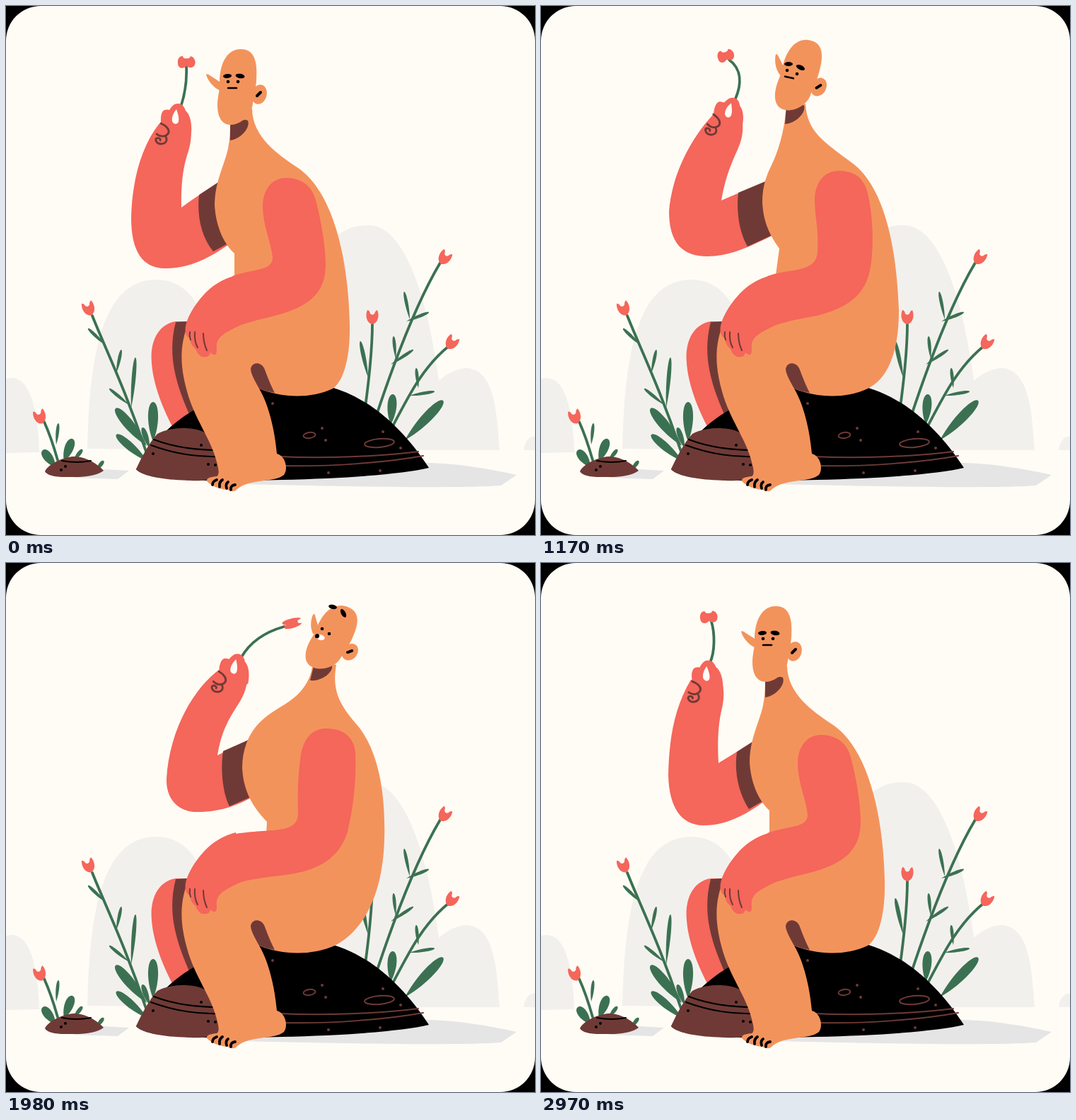
Animation, 748 px wide and 748 px high, one loop 3060 ms. Source, as an HTML page:

```html
<!DOCTYPE html>
<html lang="en">
<head>
<meta charset="utf-8">
<title>Smelling a flower</title>
<style>
  html, body { margin: 0; height: 100%; overflow: hidden; background: #000; }
  svg { display: block; width: 100vw; height: 100vh; }
  .paper { fill: #fffcf5; }
  .hill { fill: #f2f0ed; }
  .shade { fill: #e5e5e6; }
  .skin { fill: #f3935c; }
  .red { fill: #f5665b; }
  .brown { fill: #6f3a36; }
  .green { fill: #3b7152; }
  .line { fill: none; stroke-linecap: round; stroke-width: 2; stroke: #000; }
  .line.brown { stroke: #6f3a36; }
  .line.green { stroke: #3b7152; stroke-width: 3.8; }
</style>
</head>
<body>
<svg viewBox="0 0 748 748">
  <rect class="paper" width="748" height="748" rx="49"/>
  <g class="hill">
    <path d="M0 527C25 520 44 545 47 631L0 632Z"/>
    <path d="M115 626C118 480 140 388 212 387C265 387 285 440 295 500L300 628Z"/>
    <path d="M440 628L455 340C470 318 490 309 515 310C560 312 595 400 612 530C625 518 640 512 652 512C690 515 694 570 698 628Z"/>
    <path d="M732 628C734 612 742 608 748 609V628Z"/>
  </g>
  <path class="shade" d="M590 646C640 646 690 656 722 663L700 678C650 682 500 680 330 676L400 655ZM120 654L174 657L158 669L95 667Z"/>

  <g id="plants">
    <path class="line green" d="M122 438C142 488 168 540 198 630M54 588Q64 610 73 642M518 448C518 490 513 530 508 567M614 363C580 420 550 500 524 578M626 481C590 510 570 550 548 592"/>
  </g>

  <path class="red" d="M240 446C215 450 203 475 206 505C208 535 222 570 236 596L272 572L258 446Z"/>
  <path class="brown" d="M240 447L258 446L252 470C248 510 258 550 270 574L262 584C245 545 226 500 240 447Z"/>

  <path d="M184 655C200 625 232 590 268 570C330 535 400 532 463 540C516 556 562 598 598 653C560 662 480 668 390 670C300 672 200 674 184 655Z"/>
  <path class="brown" d="M184 655C192 637 203 617 214 605C235 594 272 594 285 606L308 650C305 670 285 672 260 671C225 670 195 666 184 655Z"/>
  <path class="line" d="M209 613C240 625 270 628 302 628M205 621C240 634 270 638 302 637"/>
  <path class="line brown" d="M385 637C450 640 530 637 583 630M388 650C460 652 540 645 590 636"/>
  <ellipse class="line brown" cx="429" cy="607" rx="8.5" ry="4" transform="rotate(-8 429 607)"/>
  <ellipse class="line brown" cx="528" cy="618" rx="21" ry="6" transform="rotate(-5 528 618)"/>
  <path class="brown" d="M55 658C62 645 85 637 98 637C115 638 130 648 138 657Q125 667 90 666Q60 667 55 658Z"/>
  <path class="line" d="M79 643Q100 647 120 643"/>
  <g id="dots"></g>

  <path id="rear" class="red"/>
  <path id="band" class="brown"/>
  <path id="body" class="skin"/>
  <path class="skin" d="M258 448C245 480 246 510 256 545C266 583 290 612 298 645C301 656 302 662 298 665C290 666 283 667 284 672C290 678 300 683 313 684Q322 689 327 683C345 668 380 674 393 663C399 655 396 637 383 633C380 600 372 565 358 541L420 540V430Z"/>
  <path class="brown" d="M346 513C348 503 360 503 365 512C370 525 375 538 380 547Q368 545 358 541C352 530 346 520 346 513Z"/>
  <path class="line" style="stroke-width:3.8" d="M298 670q-6 2-6 7M306 670q-5 3-4 10M314 673q-4 3-2 9M324 677q-7 1-6 7"/>

  <path id="arm" class="red"/>
  <path class="red" d="M325 381C300 388 287 399 273 416C262 430 251 450 254 462Q255 468 260 470Q261 480 268 485Q273 498 282 496Q287 497 289 490Q298 498 298 486C296 470 305 464 330 452Z"/>
  <path class="line brown" d="M260 461Q259 467 261 472M267 461Q266 474 271 483M279 463Q279 476 284 487"/>

  <path id="stem" class="line green"/>
  <path id="flower" class="red" d="M-12 2C-13-4-9-9-5-8Q-4-4 0-5Q4-4 6-8C11-7 14-1 12 4C10 9 5 9 0 6C-5 11-12 9-12 2Z"/>
  <g id="hand">
    <path class="red" d="M212 185L219 165Q218 150 224 147Q229 146 231 147C235 141 238 138 243 138C249 138 252 142 254 148C260 153 263 165 262 178L240 195Z"/>
    <path class="paper" d="M241 146C236 152 234 158 235 163C237 168 243 168 244 163C245 158 243 152 241 146Z"/>
    <path class="line brown" style="stroke-width:2.8" d="M219 166C226 169 231 174 230 179C227 185 219 186 213 181M226 185C229 191 225 195 219 195C213 195 210 189 213 187C216 186 219 188 218 190"/>
  </g>

  <path id="neck" class="brown" d="M0-22C8-22 18-32 25-28C29-18 15-2 0 0Z"/>
  <g id="head">
    <g class="skin">
      <path d="M299 140C299 128 303 118 302 105C303 80 313 61 332 61C351 61 356 78 354 105C353 118 352 120 349 138C347 156 330 168 318 168C304 168 299 155 299 140Z"/>
      <path id="nose" d="M304 120C292 116 284 102 283 97Q284 95 288 98L305 109Z"/>
      <ellipse cx="358" cy="125" rx="10.5" ry="14" transform="rotate(15 358 125)"/>
    </g>
    <path class="line" style="stroke-width:4" d="M355 127L360 122"/>
  </g>
  <ellipse id="brow1" rx="6" ry="3"/>
  <ellipse id="brow2" rx="6.5" ry="3.2"/>
  <circle id="eye1" r="2.3"/>
  <circle id="eye2" r="2.3"/>
  <path id="mouth" class="line" style="stroke-width:2.6" d="M-6 0H6"/>
  <g id="grin">
    <ellipse fill="#fff" cx="1" rx="7" ry="4.5"/>
    <circle cx="-5" cy="-1" r="3.6"/>
  </g>
</svg>

<script>
const LOOP = 3060, STEP = 90;
const $ = id => document.getElementById(id);
const add = (id, html) => $(id).insertAdjacentHTML('beforeend', html);

// Plants: leaves from rounded tip to pointed base, and tulips
function leaf(x1, y1, x2, y2, w = 3.6) {
  const len = Math.hypot(x2 - x1, y2 - y1);
  const nx = (y1 - y2) / len * w, ny = (x2 - x1) / len * w;
  const mx = (x1 + x2) / 2, my = (y1 + y2) / 2;
  add('plants', `<path class="green" d="M${x2} ${y2}
    C${mx + nx} ${my + ny} ${x1 + nx * .7} ${y1 + ny * .7} ${x1} ${y1}
    C${x1 - nx * .7} ${y1 - ny * .7} ${mx - nx} ${my - ny} ${x2} ${y2}"/>`);
}
function tulip(x, y, a) {
  add('plants', `<path class="red" transform="translate(${x} ${y})rotate(${a})"
    d="M-7-10C-10-4-9 8 0 10C9 8 10-4 7-10Q4-9 3-5Q0-2-3-5Q-4-10-7-10Z"/>`);
}
const dot = (x, y, cls = '') => add('dots', `<circle class="${cls}" cx="${x}" cy="${y}" r="2"/>`);

leaf(116, 456, 140, 479); leaf(163, 486, 156, 519); leaf(183, 497, 177, 568, 4.5); leaf(146, 541, 174, 564);
leaf(155, 569, 199, 622, 11); leaf(208, 560, 208, 616, 11); leaf(156, 606, 200, 644, 9); leaf(193, 596, 203, 625, 6);
leaf(74, 590, 71, 620); leaf(94, 612, 82, 644, 10); leaf(52, 628, 70, 652, 10); leaf(108, 627, 96, 642, 4.5); leaf(138, 643, 128, 656, 4.5);
leaf(501, 474, 512, 525, 4.5); leaf(563, 404, 571, 443); leaf(598, 433, 566, 446); leaf(548, 467, 551, 498);
leaf(576, 486, 544, 507); leaf(580, 512, 583, 540); leaf(606, 545, 570, 551); leaf(547, 549, 544, 592, 10);
leaf(618, 558, 564, 614, 11);
tulip(117, 428, -20); tulip(48, 581, -18); tulip(518, 440, 0); tulip(620, 356, 32); tulip(630, 476, 32);

[[377, 562], [447, 597], [452, 614], [533, 602], [558, 625], [529, 657], [456, 660]].forEach(p => dot(...p, 'brown'));
[[276, 621], [208, 633], [286, 648], [296, 649], [78, 656], [84, 651]].forEach(p => dot(...p));

// Tracks: every part is a string of numbers keyed by time
const tracks = {};
const NUM = /-?\d*\.?\d+/g;
function pose(time, parts) {
  for (const [id, shape] of Object.entries(parts)) {
    const track = tracks[id] ||= { shape, keys: [] };
    track.keys.push({ time, v: shape.match(NUM).map(Number) });
  }
}

const rest = {
  body: 'M317 165C317 195 313 208 308 222C299 248 295 262 295 282C297 315 310 338 323 350L323 380L300 450L358 541C390 554 430 556 462 541C478 530 487 495 486 450C484 350 460 258 410 227C385 210 348 185 348 145',
  arm: 'M320 382C350 371 377 375 377 356C375 335 363 310 363 283C363 260 376 243 396 243C418 243 433 255 438 275C445 300 452 340 452 365C452 405 430 425 380 438C355 444 340 448 325 454',
  head: '318 168 0 1', nose: '0',
  neck: '317 190 0',
  brow1: '313 99 -5', brow2: '331 99 8', eye1: '314 107', eye2: '328 107',
  mouth: '320 116 0', grin: '320 116 0 0'
};

pose(0, {
  ...rest,
  rear: 'M305 246C285 260 268 270 248 285C247 250 251 225 258 205C261 195 262 185 262 176L217 166C190 200 178 250 177 300C177 345 192 371 225 371C260 371 290 356 325 330',
  band: 'M273 267C270 295 275 325 293 347L325 330L305 246',
  hand: '240 157 0',
  stem: 'M247 143C253 125 256 105 255 85',
  flower: '255 79 0 1 1'
});
pose(810, {
  body: 'M318 180C318 205 316 215 313 228C304 250 296 268 295 292C297 320 310 340 324 356L323 380L300 450L358 541C390 554 430 556 466 541C487 532 503 495 502 440C500 350 470 260 410 226C375 207 349 190 349 155',
  arm: 'M320 382C350 372 378 375 378 357C375 330 365 310 365 285C365 258 380 241 400 241C422 241 436 255 441 275C447 300 453 340 453 365C453 405 430 425 380 438C355 444 340 448 325 454',
  rear: 'M314 238C290 257 268 270 248 285C247 250 251 225 258 205C261 195 262 185 262 176L217 166C190 200 178 250 177 300C177 345 192 371 225 371C260 371 290 356 325 330',
  band: 'M275 266C271 295 276 325 292 347L325 330L314 238',
  head: '313 187 0 .9', nose: '-4',
  neck: '318 207 0',
  brow1: '303 123 -5', brow2: '320 123 8', eye1: '304 132', eye2: '318 132',
  mouth: '310 141 0', grin: '310 141 0 0',
  hand: '240 157 0',
  stem: 'M247 143C253 125 257 100 256 80',
  flower: '255 73 -8 1 1'
});
pose(1170, {
  body: 'M346 150C344 175 336 205 326 225C316 245 313 260 313 277C314 310 328 330 337 343L332 380L300 450L358 541C390 554 430 556 462 541C488 528 506 495 506 430C503 340 485 255 440 222C400 192 376 178 374 138',
  arm: 'M320 382C355 370 391 378 391 345C393 315 387 300 387 272C388 250 400 233 421 233C443 233 457 243 462 265C470 300 470 335 467 362C462 405 440 425 390 438C355 444 340 448 325 454',
  rear: 'M322 246C295 258 275 266 255 275C260 245 268 225 278 203C284 190 286 178 285 166L242 155C210 190 185 240 181 290C181 335 200 354 235 354C270 354 300 338 340 318',
  band: 'M279 264C276 290 280 320 292 340L340 318L322 246',
  head: '345 147 12 .97', nose: '19',
  neck: '345 167 4',
  brow1: '350 82 0', brow2: '367 87 25', eye1: '348 91', eye2: '362 96',
  mouth: '351 101 13', grin: '351 101 13 0',
  hand: '266 148 10',
  stem: 'M275 131C283 112 285 90 266 76',
  flower: '261 70 -14 .95 1'
});
pose(1620, {
  body: 'M412 120C408 165 385 178 358 195C318 222 305 250 305 280C307 320 328 345 339 350L338 378L300 450L358 541C390 554 430 556 462 541C500 515 514 470 515 390C518 320 510 250 475 215C445 180 432 165 442 110',
  arm: 'M320 384C360 370 407 378 407 340C404 315 406 290 412 258C417 238 428 225 445 225C470 225 484 238 486 255C489 290 485 350 477 378C465 410 440 430 395 438C355 444 340 448 325 454',
  rear: 'M325 231C308 236 298 239 285 243C297 215 310 200 325 183C338 170 346 160 348 145L316 121C260 145 205 230 201 275C200 305 220 319 250 319C275 319 295 315 325 307',
  band: 'M299 239C291 265 290 290 295 315L325 307L325 231',
  head: '413 125 23 .94', nose: '24',
  neck: '406 143 15',
  brow1: '449 36 0', brow2: '463 46 75', eye1: '430 69', eye2: '441 76',
  mouth: '430 82 20', grin: '430 82 10 1',
  hand: '332 128 30',
  stem: 'M346 116C360 100 385 80 406 72',
  flower: '408 67 72 .9 1'
});
pose(1980, {
  body: 'M434 140C430 185 395 198 375 212C345 232 334 260 334 290C336 330 356 352 369 366L368 382L300 450L358 541C390 554 430 556 465 541C505 520 533 470 535 390C537 320 525 260 493 225C470 198 461 178 467 144',
  arm: 'M320 384C368 374 413 386 413 354C412 325 413 300 417 270C422 247 433 234 453 234C478 234 492 247 494 268C496 310 490 350 483 380C472 415 445 435 395 441C355 446 340 448 325 454',
  rear: 'M350 247C330 256 315 264 299 272C303 245 312 225 325 205C335 190 341 178 341 162L304 149C260 180 230 245 227 305C226 335 245 352 270 352C300 352 325 345 355 327',
  band: 'M307 266C303 290 306 325 316 344L355 327L350 247',
  head: '435 148 21 .91', nose: '23',
  neck: '430 166 14',
  brow1: '462 62 12', brow2: '477 71 62', eye1: '447 93', eye2: '457 100',
  mouth: '444 104 20', grin: '444 105 12 .85',
  hand: '323 147 7',
  stem: 'M333 133C345 112 365 98 393 90',
  flower: '405 85 75 .55 1.6'
});
pose(2340, {
  body: 'M383 185C372 212 363 220 354 233C338 255 332 270 332 290C334 315 341 335 349 345L346 380L300 450L358 541C390 554 430 556 462 541C490 520 500 480 501 415C503 340 482 270 444 229C422 208 410 195 411 155',
  arm: 'M320 382C355 371 382 375 382 360C378 335 363 312 363 283C363 262 376 244 397 244C418 244 433 255 438 275C447 310 456 345 456 375C455 413 432 431 390 441C355 447 340 449 325 454',
  rear: 'M345 266C315 279 290 290 265 300C250 265 245 245 242 220C239 195 237 185 230 175L189 185C180 215 182 260 190 290C200 345 220 386 252 386C290 386 320 368 358 343',
  band: 'M314 282C307 305 312 340 325 361L358 343L345 266',
  head: '377 190 16 .95', nose: '15',
  neck: '370 213 12',
  brow1: '394 113 15', brow2: '410 119 30', eye1: '387 131', eye2: '400 138',
  mouth: '390 143 16', grin: '390 143 16 0',
  hand: '208 178 -27',
  stem: 'M207 160C225 138 250 147 286 149',
  flower: '291 148 97 .9 1.05'
});
pose(2750, rest);
pose(2970, {
  rear: 'M305 249C285 262 270 271 251 283C249 250 251 225 256 205C259 190 259 180 256 168L212 165C188 205 181 250 180 300C181 345 198 371 230 371C262 371 290 357 325 330',
  band: 'M277 267C273 295 279 325 294 348L325 330L305 249',
  hand: '234 157 -4',
  stem: 'M239 141C246 125 246 100 241 83',
  flower: '237 76 -4 1 1'
});

// Smooth cyclic interpolation that rests at extremes
function sample(keys, t) {
  const n = keys.length;
  const at = i => {
    const k = keys[(i + n) % n];
    return { time: k.time + Math.floor(i / n) * LOOP, v: k.v };
  };
  const i = keys.findLastIndex(k => k.time <= t);
  const [a, b, c, d] = [at(i - 1), at(i), at(i + 1), at(i + 2)];
  const h = c.time - b.time, u = (t - b.time) / h;
  const tangent = (p, q) => p * q > 0 ? 2 * p * q / (p + q) : 0;
  return b.v.map((y, j) => {
    const s0 = (y - a.v[j]) / (b.time - a.time);
    const s1 = (c.v[j] - y) / h;
    const s2 = (d.v[j] - c.v[j]) / (d.time - c.time);
    const m0 = tangent(s0, s1) * h, m1 = tangent(s1, s2) * h, dy = c.v[j] - y;
    return y + u * (m0 + u * (3 * dy - 2 * m0 - m1 + u * (m0 + m1 - 2 * dy)));
  });
}

const place = (x, y, a = 0, sx = 1, sy = sx) => `translate(${x} ${y})rotate(${a})scale(${sx} ${sy})`;
const transforms = {
  head: (x, y, a, sy) => place(x, y, a, 1, sy) + 'translate(-318 -168)',
  nose: a => `rotate(${a} 303 112)`,
  hand: (x, y, a) => place(x, y, a) + 'translate(-240 -157)'
};

function draw(t) {
  for (const [id, { shape, keys }] of Object.entries(tracks)) {
    const v = sample(keys, t);
    if (shape[0] === 'M') {
      let i = 0;
      $(id).setAttribute('d', shape.replace(NUM, () => v[i++].toFixed(2)));
    } else {
      $(id).setAttribute('transform', (transforms[id] || place)(...v));
    }
  }
  $('mouth').style.opacity = sample(tracks.grin.keys, t)[3] > .4 ? 0 : 1;
}

const start = performance.now();
function tick() {
  const t = Math.floor((performance.now() - start) % LOOP / STEP) * STEP;
  draw(t < 2 * STEP ? 0 : t);
  requestAnimationFrame(tick);
}
tick();
</script>
</body>
</html>
```
